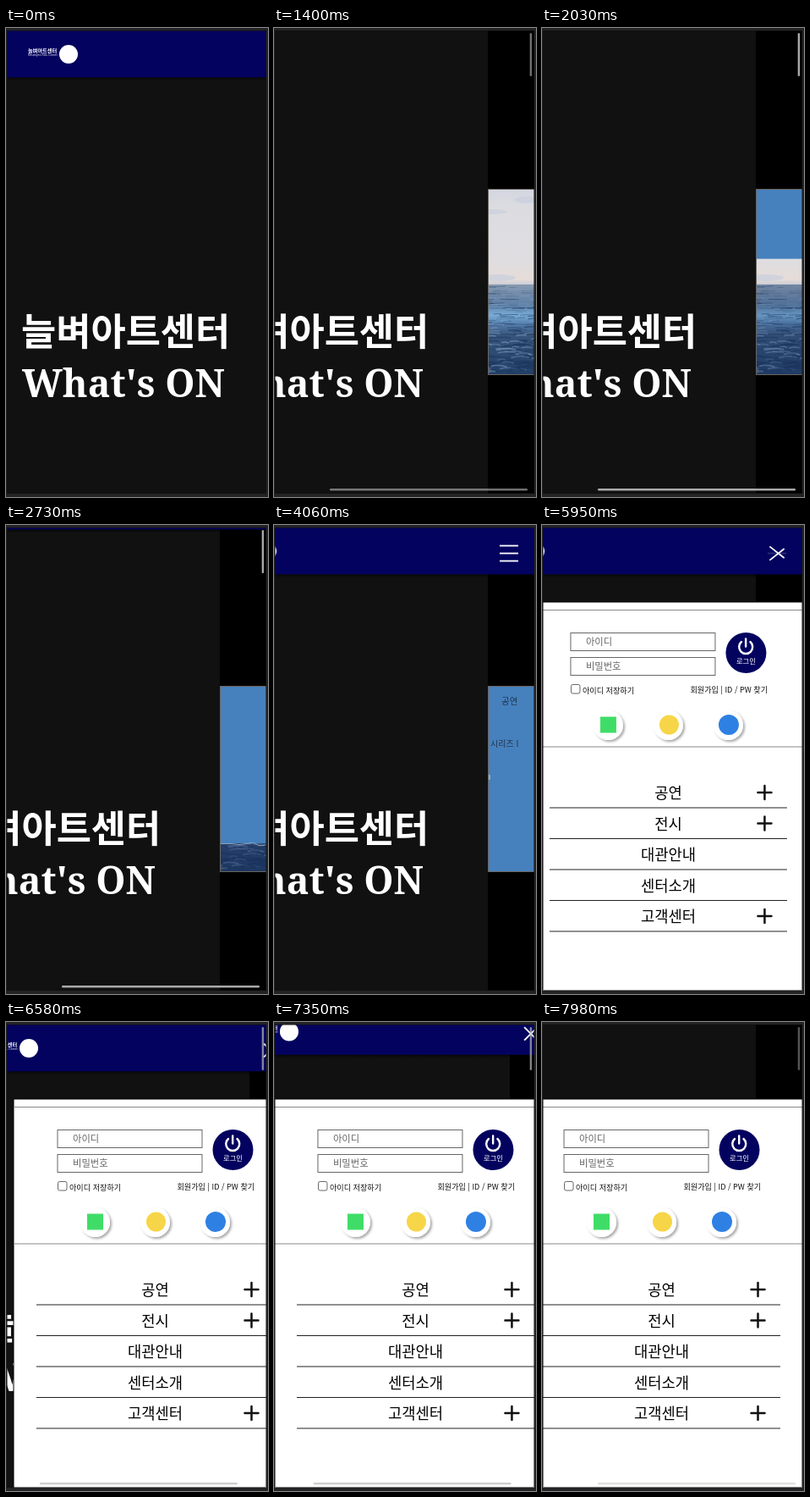
Write an HTML page that moves like this. It is 310 px wide and 554 px high and loops after 8 s.

```html
<!DOCTYPE html>
<html lang="ko">
<head>
<meta charset="utf-8">
<style>
  html, body { margin: 0; width: 100%; height: 100%; overflow: hidden; background: #222; }
  svg { display: block; width: 310px; height: 554px; }
  text { font-family: "Noto Sans CJK KR", "Noto Sans CJK", "Noto Sans", sans-serif; white-space: pre; }
  .title { font-size: 44.8px; font-weight: 700; fill: #fff; }
  .latin { font-family: "Noto Serif", serif; }
  .mid { text-anchor: middle; }
  .rule { stroke: #222; stroke-width: 1.2; }
  .box { fill: #fff; stroke: #666; }
  .hint { font-size: 11.3px; fill: #666; }
  .note { font-size: 9.1px; fill: #111; }
  .item { font-size: 17.7px; fill: #000; }
  .poster { font-weight: 500; fill: #151a26; }
  .plus { stroke: #111; stroke-width: 2.5; stroke-linecap: round; }
</style>
</head>
<body>
<svg viewBox="0 0 310 554">
  <defs>
    <clipPath id="screen"><rect x="1" y="3" width="307" height="547"/></clipPath>
    <clipPath id="photoClip"><rect x="335" y="190" width="120" height="220"/></clipPath>
    <linearGradient id="sky" x1="0" y1="0" x2="0" y2="1">
      <stop offset="0" stop-color="#d3d7e0"/><stop offset=".2" stop-color="#dcdce0"/>
      <stop offset=".75" stop-color="#dfdde0"/><stop offset=".93" stop-color="#e6dcd8"/>
      <stop offset="1" stop-color="#c3c9d6"/>
    </linearGradient>
    <linearGradient id="water" x1="0" y1="0" x2="0" y2="1">
      <stop offset="0" stop-color="#8799b0"/><stop offset=".22" stop-color="#5f80a6"/>
      <stop offset=".34" stop-color="#78acd8"/><stop offset=".42" stop-color="#5a86b4"/>
      <stop offset=".55" stop-color="#38557c"/><stop offset="1" stop-color="#223f68"/>
    </linearGradient>
    <linearGradient id="shade" x1="0" y1="0" x2="0" y2="1">
      <stop offset="0" stop-opacity=".6"/><stop offset="1" stop-opacity="0"/>
    </linearGradient>
    <filter id="soft" x="-30%" y="-30%" width="170%" height="170%">
      <feDropShadow dx="2" dy="2" stdDeviation="1.6" flood-opacity=".35"/>
    </filter>
  </defs>

  <g clip-path="url(#screen)">
    <rect width="310" height="554" fill="#000"/>
    <g id="page">
      <rect x="-10" width="345" height="554" fill="#111"/>
      <text class="title" x="18" y="375">늘벼아트센터</text>
      <text class="title latin" x="19" y="436">What's ON</text>

      <g clip-path="url(#photoClip)">
        <rect x="335" y="190" width="120" height="115" fill="url(#sky)"/>
        <g fill="#c9d0de" opacity=".7">
          <ellipse cx="342" cy="217" rx="16" ry="3"/>
          <ellipse cx="380" cy="203" rx="14" ry="4"/>
          <ellipse cx="346" cy="295" rx="22" ry="4"/>
        </g>
        <rect x="335" y="303" width="120" height="107" fill="url(#water)"/>
        <g id="waves" fill="none"></g>
        <rect id="dusk" x="335" y="303" width="120" height="107" fill="#142c58"/>
        <rect id="cover" x="335" y="190" width="120" fill="#4681be"/>
        <path id="foam" d="M335 .5h14q9 2 18 0t12 1 14-1h60" fill="none" stroke="#b9cbe0"/>
        <g id="caption">
          <text class="poster" x="351" y="212" font-size="10.500">공연</text>
          <text class="poster" x="338" y="262" font-size="10">시리즈 I</text>
          <rect x="335" y="295" width="3" height="6" rx="1" fill="#a9bdc4"/>
        </g>
        <rect x="335.500" y="190.500" width="130" height="219" fill="none" stroke="#6a655e"/>
      </g>

      <g id="menu">
        <rect x="-26" y="91" width="400" height="470" fill="#fff" stroke="#000"/>
        <path d="M380 100.500H-25.500V262H380" fill="none" stroke="#888"/>
        <rect class="box" x="26" y="127.500" width="171" height="21"/>
        <rect class="box" x="26" y="156.500" width="171" height="21"/>
        <text class="hint" x="44" y="142">아이디</text>
        <text class="hint" x="44" y="171">비밀번호</text>
        <rect class="box" x="26.500" y="188.500" width="10.500" height="10.500" rx="2"/>
        <text class="note" x="40" y="199">아이디 저장하기</text>
        <text class="note" x="167.500" y="198">회원가입 | ID / PW 찾기</text>
        <circle cx="233.500" cy="151" r="24" fill="#03035f"/>
        <path d="M228 138a8 8 0 1 0 10.500 0M233.200 134.500v9" fill="none" stroke="#fff" stroke-width="2.4" stroke-linecap="round"/>
        <text class="mid" x="233.500" y="164" font-size="8.300" fill="#fff">로그인</text>
        <g fill="#fff" filter="url(#soft)">
          <circle cx="70.500" cy="236.500" r="17.500"/>
          <circle cx="141.500" cy="236.500" r="17.500"/>
          <circle cx="212.500" cy="236.500" r="17.500"/>
        </g>
        <rect x="61" y="226.500" width="19" height="19" fill="#3fdd68"/>
        <circle cx="142.500" cy="236" r="11.500" fill="#f7d548"/>
        <circle cx="213" cy="236" r="12" fill="#2f80e3"/>
        <g id="items"></g>
      </g>

      <g id="header">
        <rect x="1" y="3" width="500" height="55.400" fill="#03035f"/>
        <rect x="1" y="58.400" width="500" height="4" fill="url(#shade)"/>
        <text x="26" y="28.500" font-size="6.200" font-weight="700" fill="#fff">늘벼아트센터</text>
        <text x="26" y="33" font-size="3.500" fill="#fff">Neulbyeo Arts Center</text>
        <circle cx="74" cy="31" r="11" fill="#fff"/>
        <rect id="tap" x="349" y="24" width="22" height="19" fill="#4aa0bc" opacity=".5"/>
        <g stroke="#fff" stroke-width="1.800">
          <path id="barTop" d="M-11 0H11"/>
          <path id="barMid" d="M349 33.500h22"/>
          <path id="barLow" d="M-11 0H11"/>
        </g>
      </g>
    </g>
    <g id="scrollbars" fill="#bbb">
      <rect x="302.700" y="6" width="2.400" height="51" rx="1.200"/>
      <rect id="thumb" y="544" width="234" height="2.400" rx="1.200"/>
    </g>
  </g>
  <path d="M0 0H310V554H0ZM1 3V550H308V3Z" fill="#232325" fill-rule="evenodd"/>
  <rect x="1.500" y="3.500" width="306" height="546" fill="none" stroke="#111" opacity=".5"/>
</svg>

<script>
const LOOP = 8000, STEP = 70, MAX_SCROLL = 82;
const $ = id => document.getElementById(id);
const set = (id, attrs) => {
  for (const key in attrs) $(id).setAttribute(key, attrs[key]);
};

// Piecewise linear track through [time, value] points.
function track(t, points) {
  if (t <= points[0][0]) return points[0][1];
  for (let i = 1; i < points.length; i++) {
    const [t0, v0] = points[i - 1], [t1, v1] = points[i];
    if (t < t1) return v0 + (v1 - v0) * (t - t0) / (t1 - t0);
  }
  return points[points.length - 1][1];
}
const ramp = (t, from, to) => Math.min(1, Math.max(0, (t - from) / (to - from)));
const easeOut = p => 1 - (1 - p) ** 3;
const easeInOut = p => p * p * (3 - 2 * p);

function buildItems() {
  const names = ['공연', '전시', '대관안내', '센터소개', '고객센터'];
  const expandable = [0, 1, 4];
  $('items').innerHTML = names.map((name, i) => {
    const y = 323 + i * 36.5;
    const plus = expandable.includes(i)
      ? `<path class="plus" d="M247.500 ${y - 7}h16M255.500 ${y - 15}v16"/>` : '';
    return `<text class="item mid" x="141.500" y="${y}">${name}</text>${plus}
      <path class="rule" d="M1 ${y + 11}H282"/>`;
  }).join('');
}

function buildWaves() {
  let seed = 7;
  const random = () => (seed = seed * 16807 % 2147483647) / 2147483647;
  let waves = '';
  for (let i = 0; i < 170; i++) {
    const depth = random(), x = 322 + random() * 68, y = 305 + depth * 104;
    const length = 8 + random() * 18;
    const color = random() < 0.3 ? '#8fb0d2' : '#1b355c';
    waves += `<path d="M${x} ${y}q${length / 2} ${-3 * depth} ${length} ${random() * 2 - 1}" stroke="${color}"
      stroke-width="${0.6 + 1.4 * depth}" opacity="${0.2 + random() * 0.4}"/>`;
  }
  $('waves').innerHTML = waves;
}

function scrollAt(t) {
  if (t < 6440) return MAX_SCROLL * easeInOut(ramp(t, 630, 1260));
  if (t < 7000) return track(t, [[6440, 82], [6510, 68], [6580, 47], [6650, 20], [6720, 0]]);
  return MAX_SCROLL * easeInOut(ramp(t, 7000, 7560));
}

function headerAt(t) {
  const hidden = -62;
  if (t < 2000) return hidden * easeInOut(ramp(t, 770, 1330));
  if (t < 7000) return track(t, [[2660, hidden], [2730, -53], [2870, -38], [3150, -8], [3290, 0]]);
  return hidden * easeInOut(ramp(t, 7140, 7700));
}

function draw(t) {
  const scroll = scrollAt(t);
  set('page', { transform: `translate(${-scroll} 0)` });
  set('header', { transform: `translate(0 ${headerAt(t)})` });

  const edge = track(t, [[1470, 190], [2730, 376], [3290, 410]]);
  set('cover', { height: edge - 190 });
  set('foam', { transform: `translate(0 ${edge})`, opacity: edge > 303 && edge < 409 ? 0.7 : 0 });
  set('dusk', { opacity: 0.4 * ramp(t, 1540, 2660) });
  set('caption', { opacity: track(t, [[3430, 0], [4060, 0.75], [4620, 0.88], [5110, 0.92]]) });

  const slide = 340 * (1 - easeOut(ramp(t, 5600, 6090)));
  set('menu', { transform: `translate(${MAX_SCROLL + slide} 0)`, visibility: t > 5600 ? 'visible' : 'hidden' });

  const cross = t < 5600 ? 0 : track(t, [[5600, 0.09], [6020, 1]]);
  const gap = 9 * (1 - cross);
  set('barTop', { transform: `translate(360 ${33.5 - gap}) rotate(${45 * cross})` });
  set('barLow', { transform: `translate(360 ${33.5 + gap}) rotate(${-45 * cross})` });
  const tapped = t >= 5600 && t < 5810;
  set('barMid', { opacity: 1 - cross, stroke: tapped ? '#9fe4f8' : '#fff' });
  set('tap', { visibility: tapped ? 'visible' : 'hidden' });

  set('thumb', { x: 66 - (MAX_SCROLL - scroll) * 0.745 });
  set('scrollbars', {
    opacity: track(t, [
      [630, 0], [770, 0.9], [1260, 0.9], [1400, 0.6], [1540, 0.5], [1680, 0.9], [2870, 0.9], [3150, 0],
      [6440, 0], [6510, 0.7], [7700, 0.7], [7840, 0.6], [7980, 0.45]
    ])
  });
}

function frame(now) {
  draw(Math.floor(now % LOOP / STEP) * STEP);
  requestAnimationFrame(frame);
}

buildItems();
buildWaves();
draw(0);
requestAnimationFrame(frame);
</script>
</body>
</html>
```
